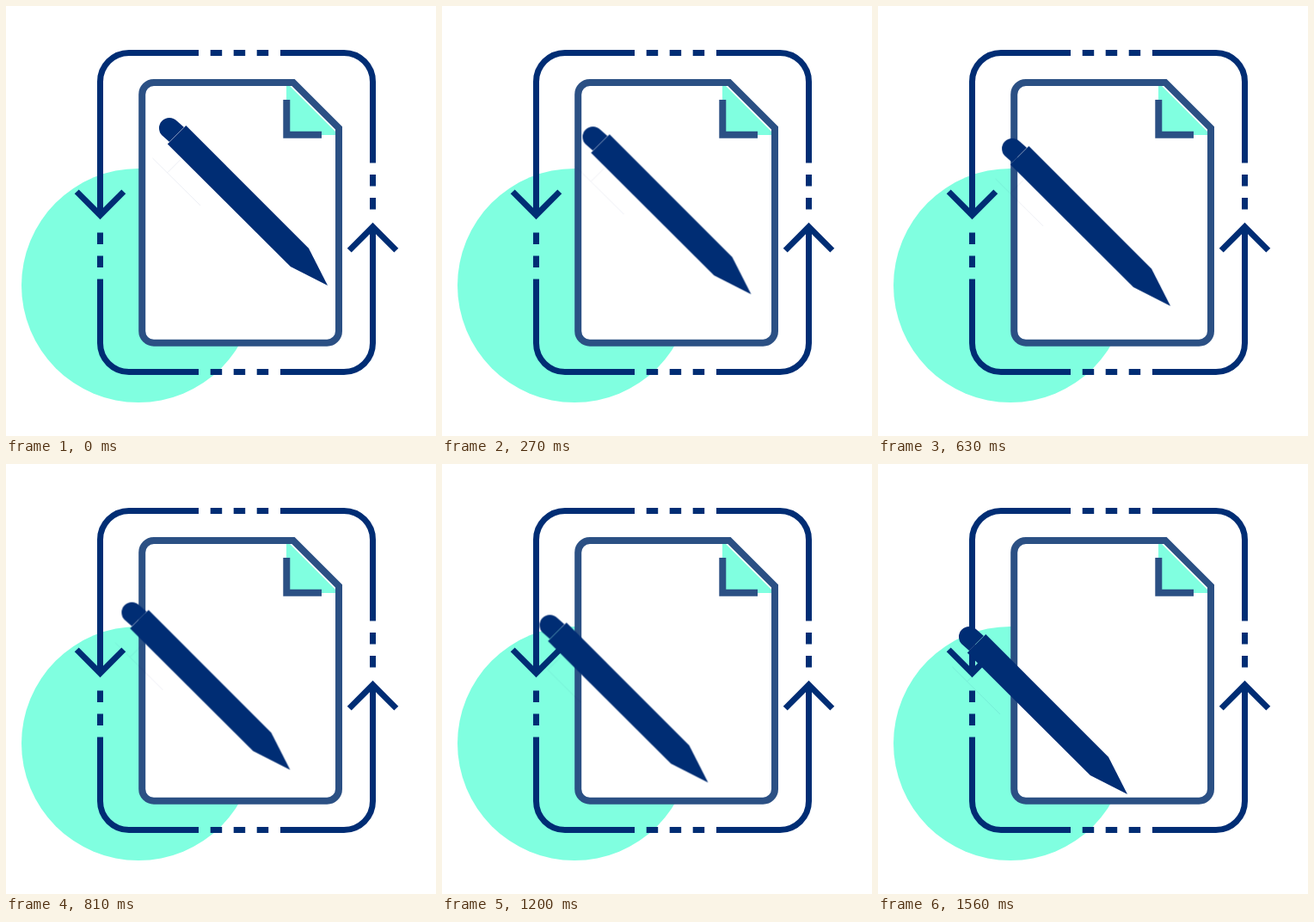
An HTML page for the animation above (4830 ms loop, 500 px wide and 500 px high).

```html
<!DOCTYPE html>
<html lang="en">
<head>
<meta charset="utf-8">
<title>Document and pen</title>
<style>
  html, body { margin: 0; width: 100%; height: 100%; overflow: hidden; background: #fff; }
  svg { display: block; width: 100vw; height: 100vh; }
  .mint { fill: #80ffe0; }
  .navy { fill: #002d74; }
  .loop, .page { fill: none; stroke-miterlimit: 10; }
  .loop { stroke: #002d74; stroke-width: 7; }
  .page { stroke: #2b5084; stroke-width: 8; }
  .sheet { fill: #fff; }
  .hair { fill: none; stroke: #002d74; stroke-opacity: .08; stroke-width: 1; }
  .seam { stroke: #fff; stroke-opacity: .2; stroke-width: .7; }
</style>
</head>
<body>
<svg viewBox="0 0 500 500">
  <circle class="mint" cx="154" cy="325" r="136"/>

  <!-- page with folded corner -->
  <path class="sheet" d="M172 89H334L387 142V378a13.7 13.7 0 0 1-13.7 13.7H172A13.7 13.7 0 0 1 158.2 378V103A13.7 13.7 0 0 1 172 89Z"/>
  <path class="mint" d="M326 89L387 150H326Z"/>
  <path class="page sheet-edge" d="M172 89H334L387 142V378a13.7 13.7 0 0 1-13.7 13.7H172A13.7 13.7 0 0 1 158.2 378V103A13.7 13.7 0 0 1 172 89Z"/>
  <path class="page" d="M326.3 109V149.7H367"/>

  <!-- circulating arrows -->
  <g class="loop">
    <path d="M109.5 243V88A33.5 33.5 0 0 1 143 54.5H224"/>
    <path d="M319 54.5H393A33.5 33.5 0 0 1 426.5 88V182.5"/>
    <path d="M426.5 257V392A33.5 33.5 0 0 1 393 425.5H319"/>
    <path d="M224 425.5H143A33.5 33.5 0 0 1 109.5 392V317.5"/>
    <path d="M82.2 215.9L109.5 243.2L136.8 215.9"/>
    <path d="M399.2 284.1L426.5 256.8L453.8 284.1"/>
    <g stroke-dasharray="13.5 13.5">
      <path d="M237.7 54.5H305.2"/>
      <path d="M237.7 425.5H305.2"/>
      <path d="M426.5 196V236.5"/>
      <path d="M109.5 263.5V304"/>
    </g>
  </g>

  <g id="pen">
    <path class="hair" d="M170.5 177L226 232M188 193.5L203 178.5"/>
    <path class="navy" d="M207 141L198.5 133.5A12 12 0 1 0 181.5 150.5L190 158Z"/>
    <path class="navy" d="M209.3 139L352 281.8L374 325L330.8 303L187.8 160.5Z"/>
    <path class="seam" d="M190 158L207 141"/>
  </g>
</svg>
<script>
  const LOOP = 4830, GLIDE = 1560, STEP = 30;
  const shift = (x, y) => `translate(${x}px, ${y}px)`;

  document.getElementById('pen').animate([
    { offset: 0, transform: shift(0, 0), easing: `steps(${GLIDE / STEP}, end)` },
    { offset: GLIDE / LOOP, transform: shift(-84, 59) },
    { offset: 1, transform: shift(-84, 59) }
  ], { duration: LOOP, iterations: Infinity });
</script>
</body>
</html>
```
